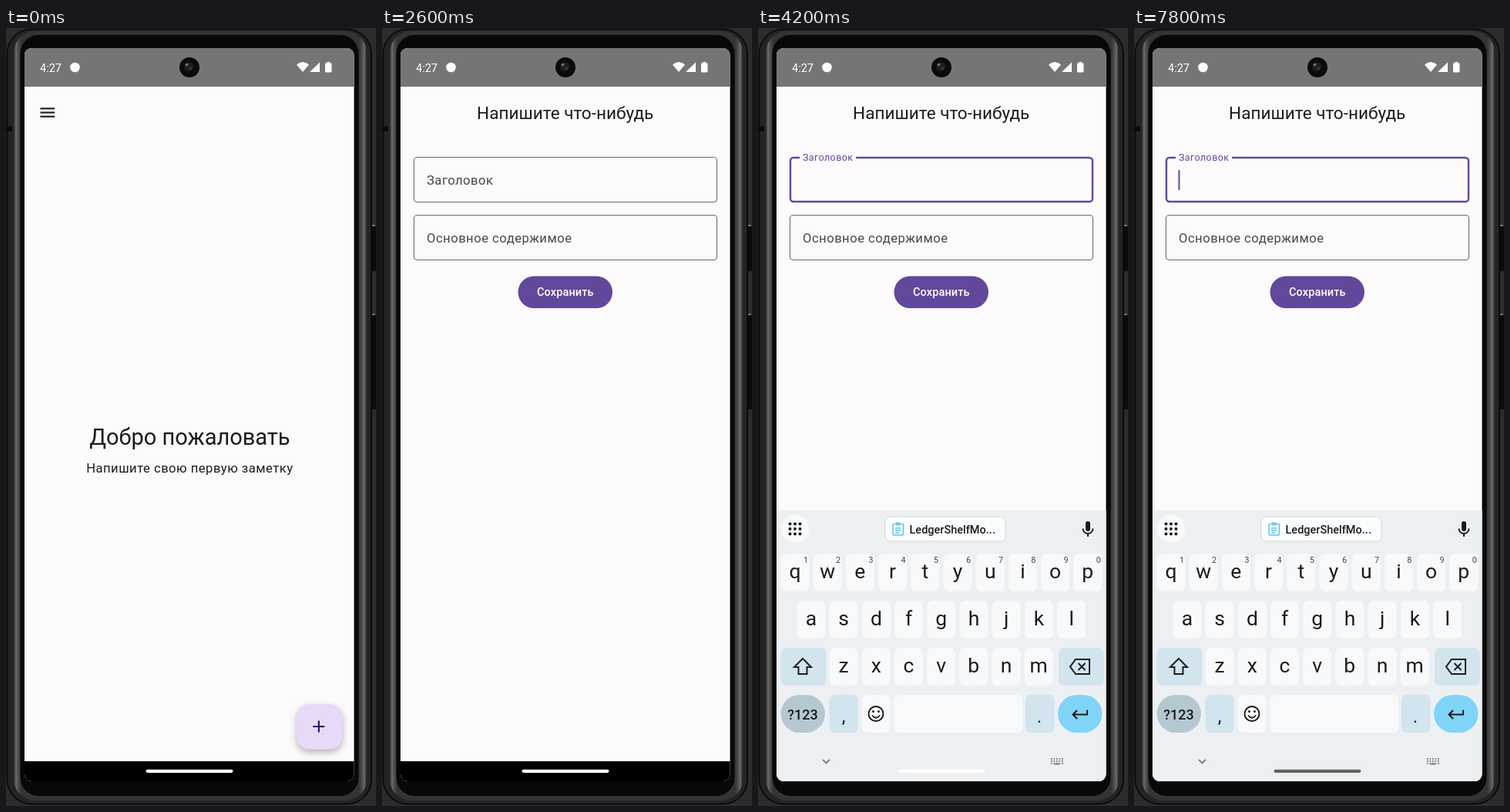
Write an HTML page with a canvas that moves like this. It is 480 by 1008 pixels and loops after 8000 ms.

```html
<!DOCTYPE html>
<html lang="ru">
<head>
<meta charset="utf-8">
<title>Заметки</title>
<style>
html, body { margin: 0; width: 100%; height: 100%; overflow: hidden; background: #1a1a1a; }
canvas { display: block; width: 480px; height: 1008px; }
</style>
</head>
<body>
<canvas id="stage"></canvas>
<script>
const W = 480, H = 1008, LOOP = 8000, STEP = 200;
const PAPER = '#fcfafb', INK = '#1c1b1f', PRIMARY = '#62489b';
const KEY = '#f7f9fa', BLUE_KEY = '#d2e4ee';
const canvas = document.getElementById('stage');
const ratio = window.devicePixelRatio || 1;
canvas.width = W * ratio;
canvas.height = H * ratio;
const ctx = canvas.getContext('2d');

const clamp = v => Math.min(1, Math.max(0, v));
const mix = (a, b, p) => a + (b - a) * p;
const smooth = p => p * p * (3 - 2 * p);
const easeOut = p => 1 - (1 - p) ** 2;
const progress = (t, from, to) => clamp((t - from) / (to - from));

function box(x0, y0, x1, y1, r, fill, stroke, width = 1) {
  ctx.beginPath();
  ctx.roundRect(x0, y0, x1 - x0, y1 - y0, r);
  if (fill) { ctx.fillStyle = fill; ctx.fill(); }
  if (stroke) { ctx.strokeStyle = stroke; ctx.lineWidth = width; ctx.stroke(); }
}

function disc(x, y, r, fill) {
  ctx.beginPath();
  ctx.arc(x, y, r, 0, Math.PI * 2);
  ctx.fillStyle = fill;
  ctx.fill();
}

function shape(path, stroke, width = 2, fill) {
  const p = new Path2D(path);
  if (fill) { ctx.fillStyle = fill; ctx.fill(p); }
  if (stroke) { ctx.strokeStyle = stroke; ctx.lineWidth = width; ctx.stroke(p); }
}

function text(str, x, y, size, color = INK, { align = 'left', weight = 400, spacing = 0 } = {}) {
  ctx.font = `${weight} ${size}px Roboto, sans-serif`;
  ctx.letterSpacing = `${spacing}px`;
  ctx.textAlign = align;
  ctx.fillStyle = color;
  ctx.fillText(str, x, y);
}

function withAlpha(alpha, draw) {
  if (alpha <= 0) return;
  ctx.save();
  ctx.globalAlpha *= alpha;
  draw();
  ctx.restore();
}

function rimGradient(left, right) {
  const rim = ctx.createLinearGradient(left, 0, right, 0);
  const span = right - left;
  const stops = [[0, '#242424'], [3, '#6c6c6c'], [6, '#4c4c4c'], [10, '#343434']];
  for (const [inset, color] of stops) {
    rim.addColorStop(inset / span, color);
    rim.addColorStop(1 - inset / span, color);
  }
  return rim;
}

function drawPhone() {
  ctx.fillStyle = '#2c2c2c';
  ctx.fillRect(0, 0, W, H);
  box(1.5, 1.5, 474, 1005.5, 32, '#242424', '#0c0c0c', 2);
  box(10, 4, 468, 1001, 28, rimGradient(10, 468));
  box(18.5, 9, 457.5, 995, 24, '#080808');
  ctx.fillStyle = '#0a0a0a';
  ctx.fillRect(475, 256, 5, 59);
  ctx.fillRect(475, 371, 5, 123);
  ctx.fillStyle = '#777';
  ctx.fillRect(475, 255, 4, 2);
  ctx.fillRect(475, 370, 4, 2);
  ctx.fillStyle = '#0c0c0c';
  ctx.fillRect(0, 127, 8, 7);
}

function drawStatusBar() {
  ctx.fillStyle = '#757575';
  ctx.fillRect(24, 26, 428, 50);
  text('4:27', 44, 57, 14.5, '#fff');
  disc(89.5, 51, 6.3, '#fff');
  shape('M377 47.5 Q385 40.5 393 47.5 L385 57 Z', null, 0, '#fff');
  shape('M394 57 H407 V44.5 Z', null, 0, '#fff');
  box(414, 45.5, 422.5, 57.5, 1, '#fff');
  ctx.fillRect(416.3, 44, 4, 2);
  disc(238, 51, 13, '#0b0b0b');
  disc(237, 50, 6, '#20201f');
  disc(234.5, 47.5, 1.8, '#777');
  disc(239.5, 52, 1.2, '#555');
}

function drawWelcome(t) {
  ctx.fillStyle = INK;
  for (let i = 0; i < 3; i++) ctx.fillRect(44.5, 103.3 + i * 5.2, 18.7, 2.1);
  text('Добро пожаловать', 238.4, 540, 29, INK, { align: 'center' });
  text('Напишите свою первую заметку', 238.4, 575.5, 16.6, INK, { align: 'center', spacing: 0.5 });

  const press = smooth(progress(t, 1000, 1750));
  ctx.save();
  ctx.shadowColor = 'rgba(0,0,0,.28)';
  ctx.shadowBlur = 8 * ratio;
  ctx.shadowOffsetY = 4 * ratio;
  box(377, 876, 436.5, 934.5, 16.5, '#e7daf8');
  ctx.restore();
  withAlpha(press, () => box(377, 876, 436, 935, 16.5, '#cfc1e8'));
  shape('M398.3 905 H413.3 M405.8 897.5 V912.5', '#21005d', 2);
}

function drawField(y, label, focus) {
  const focused = focus > 0;
  const inset = focused ? 0.5 : 0;
  box(41.5 + inset, y + inset, 434.5 - inset, y + 58 - inset, 4, null,
    focused ? PRIMARY : '#716d77', focused ? 2.4 : 1.1);
  if (focused) {
    ctx.fillStyle = PAPER;
    ctx.fillRect(mix(90, 54, focus), y - 2, 73 * focus, 5);
  }
  text(label, 58, mix(y + 35.3, y + 4.2, focus), mix(16.6, 12.5, focus),
    focused ? PRIMARY : '#49454f', { spacing: mix(0.5, 0.4, focus) });
}

function cursorVisible(t) {
  const toggles = [3800, 4200, 4600, 5200, 5600, 6000, 6600, 7200, 7800];
  return toggles.filter(at => t >= at).length % 2 === 1;
}

function drawEditor(t) {
  text('Напишите что-нибудь', 237.7, 117.7, 22.55, INK, { align: 'center' });
  drawField(167.5, 'Заголовок', progress(t, 3500, 3750));
  drawField(242.5, 'Основное содержимое', 0);
  box(176.5, 321.5, 299, 363, 20.75, PRIMARY);
  text('Сохранить', 237.8, 347.3, 14.55, '#fff', { align: 'center', weight: 500, spacing: 0.1 });
  if (cursorVisible(t)) {
    ctx.fillStyle = PRIMARY;
    ctx.fillRect(57.5, 184, 2, 26);
  }
}

function drawSuggestions() {
  disc(48, 649, 18, '#f8fafa');
  for (let i = 0; i < 9; i++) disc(41.5 + (i % 3) * 6.5, 642.5 + Math.floor(i / 3) * 6.5, 2, INK);
  box(165, 633, 321, 665, 6, '#fbfdfd', '#d3d7da');
  box(175, 642.5, 188.5, 657, 1.5, null, '#62c6e8', 1.6);
  box(179, 640.5, 184.5, 644.5, 1, '#62c6e8');
  shape('M178 648 H185.5 M178 651 H185.5 M178 654 H183', '#62c6e8', 1.3);
  text('LedgerShelfMo...', 196.5, 655, 14.5, INK, { weight: 500 });
  box(425, 639, 431, 652, 3, INK);
  shape('M421.5 648.5 A6.3 6.3 0 0 0 434.5 648.5 M428 655 V659', INK, 2);
}

function drawKeyRow(letters, x, top) {
  [...letters].forEach((letter, i) => {
    const cx = x + i * 42.2;
    box(cx - 18.5, top, cx + 18.5, top + 49, 7, KEY);
    text(letter, cx, top + 32, 26.5, INK, { align: 'center' });
    if (letters.length === 10) {
      text(String((i + 1) % 10), cx + 14, top + 12, 11, '#44474a', { align: 'center' });
    }
  });
}

function drawKeyboard() {
  ctx.fillStyle = '#edf0f2';
  ctx.fillRect(24, 625, 428, 352);
  drawSuggestions();
  drawKeyRow('qwertyuiop', 48, 681);
  drawKeyRow('asdfghjkl', 69, 742);
  drawKeyRow('zxcvbnm', 111, 803);

  box(29.5, 803, 88.5, 852, 7, BLUE_KEY);
  shape('M58 817 L69 828 H63.5 V837 H52.5 V828 H47 Z', INK, 2);
  box(390, 803, 448.5, 852, 7, BLUE_KEY);
  shape('M412 818 H430 V837 H412 L405 827.5 Z M415.5 823 L424.5 832 M424.5 823 L415.5 832', INK, 2);

  box(29.5, 864, 87, 913, 24.5, '#b5c8d2');
  text('?123', 58, 895.5, 18, INK, { align: 'center', weight: 500 });
  box(92.5, 864, 130, 913, 7, BLUE_KEY);
  text(',', 111, 900, 24, INK, { align: 'center' });
  box(135, 864, 171.5, 913, 7, KEY);
  ctx.beginPath();
  ctx.arc(153, 888.5, 9.5, 0, Math.PI * 2);
  ctx.strokeStyle = INK;
  ctx.lineWidth = 1.9;
  ctx.stroke();
  disc(149.5, 885.5, 1.5, INK);
  disc(156.5, 885.5, 1.5, INK);
  shape('M148 890.5 Q153 897 158 890.5', INK, 1.8);
  box(176.5, 864, 343.5, 913, 7, KEY);
  box(347, 864, 384.5, 913, 7, BLUE_KEY);
  text('.', 365, 900, 24, INK, { align: 'center' });
  box(389, 864, 446.5, 913, 24.5, '#7fd4f8');
  shape('M427 883.5 V889.5 H409 M414 884 L408.5 889.5 L414 895', INK, 2);

  shape('M84 948 L88.5 952.5 L93 948', '#666a6d', 1.6);
  for (let i = 0; i < 15; i++) {
    const x = 380 + (i % 5) * 3.5, y = 946 + Math.floor(i / 5) * 3;
    box(x, y, x + 1.8, y + 1.8, 0, '#74787b');
  }
  box(384, 953, 391, 954.5, 0, '#74787b');
}

function drawBottom(t) {
  if (t < 4000) {
    ctx.fillStyle = '#000';
    ctx.fillRect(24, 950, 428, 27);
  } else if (t < 4200) {
    ctx.save();
    ctx.translate(0, 110);
    withAlpha(0.65, drawKeyboard);
    ctx.restore();
    ctx.fillStyle = 'rgba(0,0,0,.45)';
    ctx.fillRect(24, 950, 428, 27);
  } else {
    drawKeyboard();
  }
  const shade = Math.round(mix(255, 100, easeOut(progress(t, 4600, 6000))));
  box(181.5, 960.7, 294.5, 965, 2.2, `rgb(${shade},${shade},${shade})`);
}

function draw(t) {
  ctx.setTransform(ratio, 0, 0, ratio, 0, 0);
  drawPhone();
  ctx.save();
  ctx.beginPath();
  ctx.roundRect(24, 26, 427.5, 950, 9);
  ctx.clip();
  ctx.fillStyle = PAPER;
  ctx.fillRect(24, 26, 428, 950);
  const fade = smooth(progress(t, 1900, 2600));
  withAlpha(1 - fade, () => drawWelcome(t));
  withAlpha(fade, () => drawEditor(t));
  drawStatusBar();
  drawBottom(t);
  ctx.restore();
}

const start = performance.now();
function tick() {
  const elapsed = (performance.now() - start) % LOOP;
  draw(Math.floor(elapsed / STEP) * STEP);
  requestAnimationFrame(tick);
}
tick();
</script>
</body>
</html>
```
